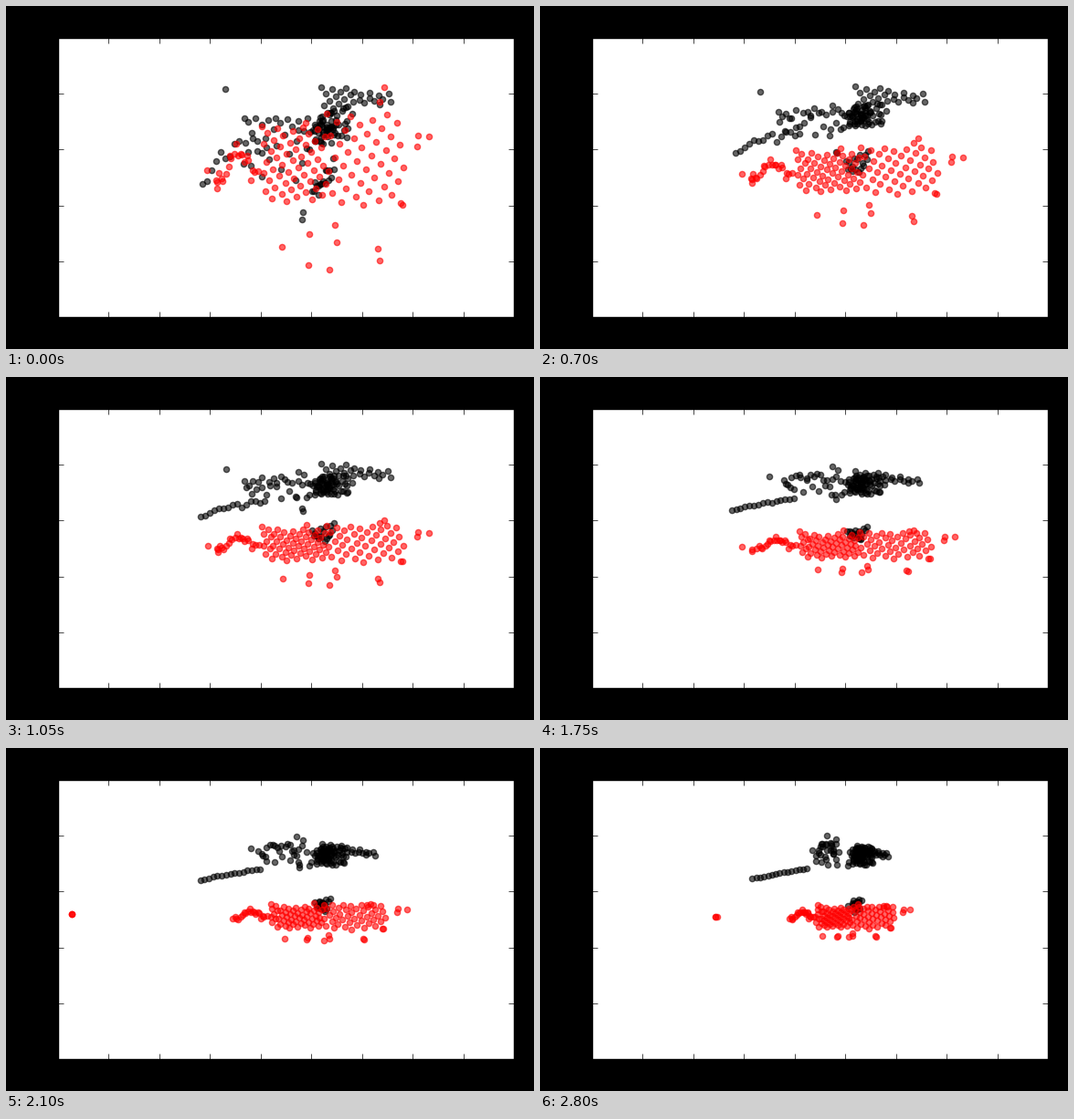
Recreate the animation shown at these times as a matplotlib script. Size 578 by 376 pixels, loop 4.55 s.

```python
import numpy as np
import matplotlib.pyplot as plt
from matplotlib.animation import FuncAnimation

W, H, DPI = 578, 376, 100
STEP_MS, STEPS, LAST = 350, 13, 8
LEFT, RIGHT, TOP, BOTTOM = 57, 556, 35.1, 341

step = np.arange(LAST + 1.0)[:, None]
FALL = .59 ** step                                # settling from below
SINK = .65 ** step                                # the same, slower
RISE = (1 + 1.5 * step) * .46 ** step             # overshoots, then settles
LIFT = 6 * step * .5 ** step                      # brief push upwards
DRIFT = 10 * np.sin(np.pi * (step / LAST) ** 2.4)  # sideways bulge
SLIDE = 1 / (1 + np.exp(1.3 * (6.4 - step)))      # late sideways squeeze
SLIDE = (SLIDE - SLIDE[0]) / (SLIDE[-1] - SLIDE[0])

rng = np.random.default_rng(5)


def spread(n, low, high):
    """Evenly spaced values with some jitter."""
    gap = (high - low) / n
    return low + gap * (np.arange(n) + rng.uniform(0, 1, n))


def mixed(n, low, high):
    """Evenly filling values in a scattered order."""
    return low + (high - low) * (np.arange(n) * .618034 % 1)


def tracks(x0, y0, x1, y1, below=FALL, above=FALL):
    """Positions of every dot at every step, shape (steps, dots, 2)."""
    gap = y0 - y1
    x = x0 + (x1 - x0) * SLIDE
    y = y1 + gap * np.where(gap > 0, below, above)
    return np.stack([x, y], axis=2)


def tail():
    """Dark dots trailing off to the left."""
    t = np.linspace(0, 1, 15)
    y0 = 186 - 42 * t + rng.uniform(-16, 14, t.size)
    path = tracks(215 + 70 * t, y0, 232 + 60 * t, 142 - 11 * t, FALL, RISE)
    path[:, :, 0] -= DRIFT
    return path


def column():
    """Dark dots that gather in an upright column."""
    n = 27
    x0 = spread(n, 258, 330)
    y0 = 122 + 72 * mixed(n, 0, 1) ** 2
    x1 = 303 + .3 * (x0 - 258) + rng.normal(0, 3, n)
    y1 = np.clip(rng.normal(115, 9, n), 99, 132)
    return tracks(x0, y0, x1, y1, FALL, RISE)


def strays():
    """Single dark dots that stand apart: start and end."""
    dots = np.array([(240, 90, 305, 112), (320, 135, 314, 95),
                     (324, 233, 313, 120), (325, 225, 315, 126)], float)
    return tracks(*dots.T, FALL, RISE)


def core():
    """Dense dark cluster in the upper middle."""
    n = 62
    u = mixed(n, -1, 1)
    x0 = np.clip(rng.normal(350, 12, n), 327, 376)
    y0 = 134 - .35 * (x0 - 350) + 13 * u + rng.normal(0, 4, n)
    path = tracks(x0, y0, 348 + .6 * (x0 - 348), 118 + 10 * u, FALL, RISE)
    path[:, :, 1] -= LIFT
    return path


def crown():
    """Dark dots above the cluster and in its arm to the right."""
    x0 = np.r_[spread(18, 344, 382), spread(12, 380, 422)]
    y0 = np.r_[mixed(18, 88, 121), mixed(12, 93, 108)]
    x1 = 348 + .44 * (x0 - 348)
    y1 = 119 + .35 * (y0 - 122) + .1 * np.maximum(x0 - 360, 0)
    path = tracks(x0, y0, x1, y1, FALL, RISE)
    path[:, :, 1] -= LIFT
    return path


def knot():
    """Small dark cluster that ends on the edge of the red band."""
    n = 17
    x0 = spread(n, 334, 359)
    y0 = 206 - 1.4 * (x0 - 334) + rng.uniform(-10, 12, n)
    x1, y1 = rng.normal(346, 4, n), rng.normal(172, 4, n)
    path = tracks(x0, y0, x1, y1)
    path[:, ::2, 1] -= 4 * LIFT
    return path


def red_band():
    edge = np.array([
        (463, 142), (451, 141), (450, 153), (414, 88), (409, 104), (302, 263),
        (332, 249), (331, 283), (354, 288), (362, 258), (360, 239),
        (407, 265), (409, 278), (434, 217), (328, 127)], float)
    xl = spread(20, 229, 276)
    yl = 174 + 15 * np.cos((xl - 229) / 7.5) + rng.uniform(-10, 10, xl.size)
    x0 = np.r_[xl, spread(54, 279, 350), spread(44, 350, 435), edge[:, 0]]
    y0 = np.r_[yl, mixed(54, 131, 215), mixed(44, 117, 220), edge[:, 1]]
    slope = np.clip(.25 * (y0 - 180), -13, 17)
    x1 = 274 + .554 * (x0 - 232) - .25 * slope
    y1 = 187 + slope - 3 * (x0 < 290)
    x1[-1], y1[-1] = 348, 171      # joins the dark knot
    return tracks(x0, y0, x1, y1, SINK, FALL)


def leapers():
    """Red dots that jump far left, then travel back."""
    x0, y0 = np.array([220, 231, 231]), np.array([179, 192, 199])
    path = tracks(x0, y0, x0 + 6, np.array([186, 188, 190]))
    back = step[6:] - 6
    path[6:, :, 0] = 71 + 60.5 * back + [0, 0, 1] * back
    path[6:, :, 1] = 181 + 1.6 * back
    return path


dark = np.concatenate([tail(), column(), strays(), core(), crown(), knot()],
                      axis=1)
red = np.concatenate([leapers(), red_band()], axis=1)

plt.rcParams["axes.linewidth"] = 1
fig = plt.figure(figsize=(W / DPI, H / DPI), dpi=DPI, facecolor="black")
ax = fig.add_axes([LEFT / W, 1 - BOTTOM / H,
                   (RIGHT - LEFT) / W, (BOTTOM - TOP) / H])
ax.set_xlim(LEFT, RIGHT)
ax.set_ylim(BOTTOM, TOP)
ax.set_xticks(np.linspace(LEFT, RIGHT, 10))
ax.set_yticks(np.linspace(TOP, BOTTOM, 6))
ax.tick_params(direction="in", length=4, width=.5, top=True, right=True,
               labelbottom=False, labelleft=False)

dots = [ax.scatter(path[0, :, 0], path[0, :, 1], s=20, c=color,
                   alpha=.6, linewidths=1)
        for path, color in ((dark, "black"), (red, "red"))]


def draw(i):
    now = min(i, LAST)
    for group, path in zip(dots, (dark, red)):
        group.set_offsets(path[now] + .5)
    return dots


anim = FuncAnimation(fig, draw, frames=STEPS, interval=STEP_MS,
                     repeat=True, repeat_delay=0, blit=False)
plt.show()
```
